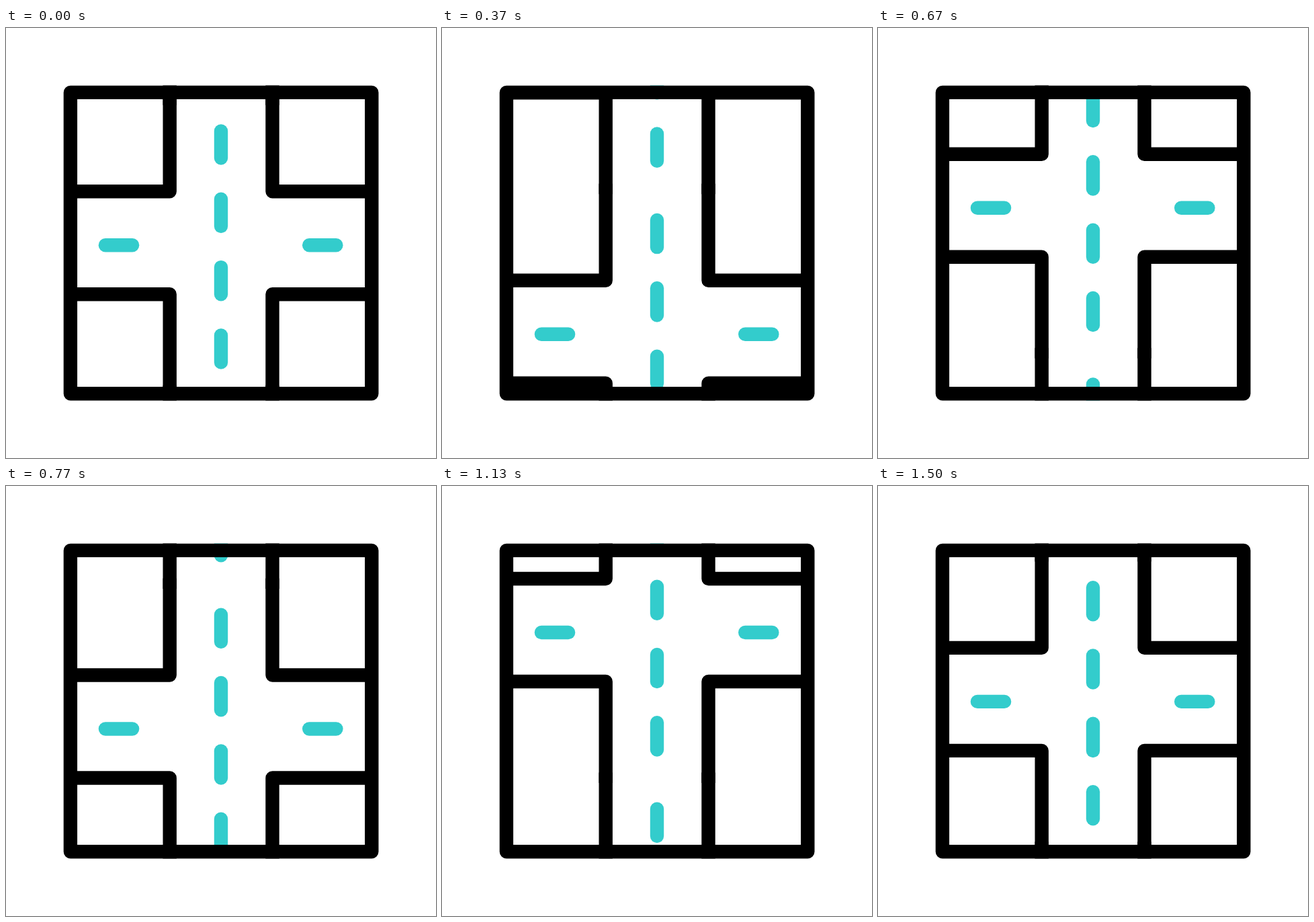
Write an HTML page with a canvas that moves like this. It is 640 px wide and 640 px high and loops after 1670 ms.

```html
<!DOCTYPE html>
<html lang="en">
<head>
<meta charset="utf-8">
<title>Crossroads</title>
<style>
  html, body { margin: 0; width: 100%; height: 100%; overflow: hidden; background: #fff; }
  canvas { display: block; }
</style>
</head>
<body>
<canvas id="stage" width="640" height="640"></canvas>
<script>
const ctx = document.getElementById('stage').getContext('2d');
const LOOP = 1670, LAST_STEP = 45;
const TILE = 432.5, REST_Y = 320.9;
const LEFT = 95.9, RIGHT = 544.3, CURB_LEFT = 243.7, CURB_RIGHT = 396.5;
const INK = '#000', PAINT = '#33cccc';

// Symmetric cubic ease, solved by bisection
function ease(x) {
  if (x >= 1) return 1;
  const a = 0.41;
  let lo = 0, hi = 1;
  for (let i = 0; i < 30; i++) {
    const s = (lo + hi) / 2, r = 1 - s;
    const at = 3 * a * s * r * r + 3 * (1 - a) * s * s * r + s * s * s;
    if (at < x) lo = s; else hi = s;
  }
  return lo * lo * (3 - 2 * lo);
}

// 30 steps per second, timed to whole hundredths
function scrollAt(time) {
  const tick = Math.floor(time / 10 + 1e-6) * 10;
  const step = Math.min(LAST_STEP, Math.floor((tick + 5) * 0.03));
  return 2 * TILE * ease(0.0362 + 0.02137 * step);
}

function line(color, ...points) {
  ctx.strokeStyle = color;
  ctx.beginPath();
  points.forEach(([x, y]) => ctx.lineTo(x, y));
  ctx.stroke();
}

function drawTile(y) {
  const upper = y - 80, lower = y + 73, reach = 224;
  ctx.lineCap = 'butt';
  for (const [edge, curb] of [[LEFT, CURB_LEFT], [RIGHT, CURB_RIGHT]]) {
    line(INK, [edge, upper], [curb, upper], [curb, y - reach]);
    line(INK, [edge, lower], [curb, lower], [curb, y + reach]);
  }
  ctx.lineCap = 'round';
  const half = 20.1;
  for (const x of [168, 471.3]) line(PAINT, [x - half, y], [x + half, y]);
  for (let i = 0; i < 4; i++) {
    const mid = y - 149.7 + i * 101.35;
    line(PAINT, [320, mid - half], [320, mid + half]);
  }
}

function draw(time) {
  ctx.fillStyle = '#fff';
  ctx.fillRect(0, 0, 640, 640);
  ctx.lineWidth = 20.4;
  ctx.lineJoin = 'round';

  ctx.save();
  ctx.beginPath();
  ctx.rect(85.6, 85.6, 468.9, 468.9);
  ctx.clip();
  const y = REST_Y + scrollAt(time) % TILE;
  for (let n = -2; n <= 1; n++) drawTile(y + n * TILE);
  ctx.restore();

  ctx.strokeStyle = INK;
  ctx.strokeRect(LEFT, LEFT, RIGHT - LEFT, RIGHT - LEFT);
}

const start = performance.now();
function play() {
  draw((performance.now() - start) % LOOP);
  requestAnimationFrame(play);
}
play();
</script>
</body>
</html>
```
